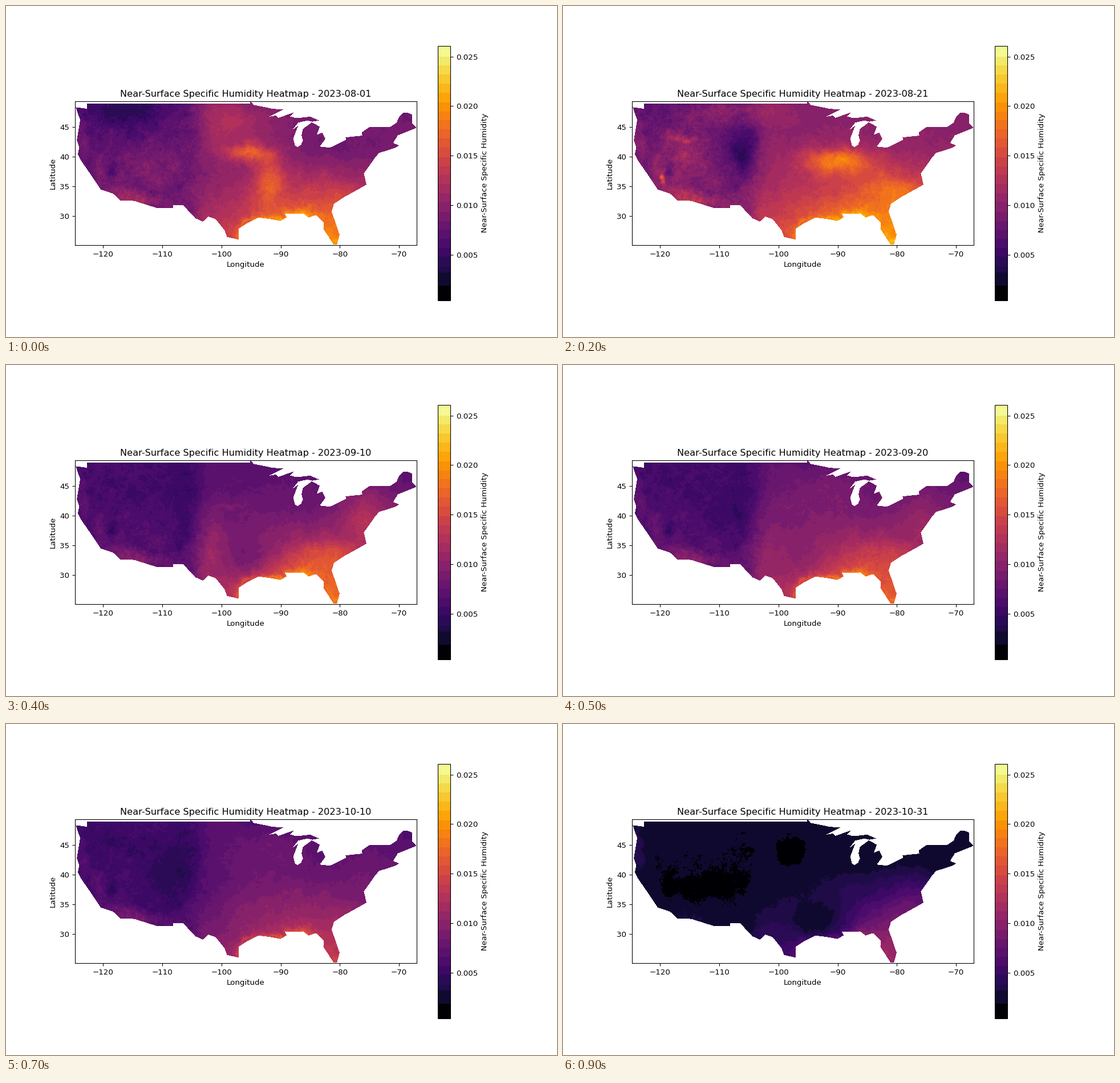
Write a matplotlib script that moves like this. It is 966x580 px and loops after 1 s.

```python
import matplotlib.pyplot as plt
import numpy as np
from matplotlib.animation import FuncAnimation
from matplotlib.colors import ListedColormap
from matplotlib.path import Path

WEST, EAST, SOUTH, NORTH = -124.767, -67.058, 25.067, 49.4
COLS, ROWS = 599, 253
VMIN, VMAX = 0.000385, 0.02609
FRAMES, LAST_DAY = 10, 91

# Key points of the outline in degrees, clockwise from the north-west corner.
SUPERIOR = [
    (-122.75, 49), (-95.15, 49), (-95.15, 49.4), (-94.6, 48.75), (-92.4, 48.3),
    (-91.4, 48.07), (-89.5, 48.0), (-92.1, 46.72), (-90.8, 46.95), (-90.4, 46.55),
    (-87.8, 47.47), (-88.45, 46.8), (-87.4, 46.5), (-85.0, 46.75), (-83.5, 46.1)]
MICHIGAN = [
    (-84.7, 45.9), (-85.5, 46.1), (-87.05, 45.75), (-88.0, 44.55), (-87.05, 45.25),
    (-87.9, 43.05), (-87.6, 41.85), (-87.2, 41.63), (-86.6, 41.95), (-86.25, 42.7),
    (-86.5, 43.6), (-86.25, 44.7), (-84.75, 45.78), (-83.4, 45.05), (-83.9, 43.7),
    (-83.0, 44.05), (-82.45, 43.0), (-83.4, 41.7), (-81.7, 41.5)]
NORTHEAST = [
    (-78.9, 42.85), (-79.05, 43.25), (-76.2, 43.55), (-76.3, 44.1), (-75.0, 44.98),
    (-71.5, 45.0), (-70.4, 45.75), (-70.0, 46.7), (-69.2, 47.45), (-68.3, 47.35),
    (-67.8, 47.07), (-67.8, 45.7), (-67.06, 44.85), (-70.2, 43.6), (-71.0, 42.3),
    (-70.0, 41.9), (-70.6, 41.5), (-73.4, 40.6)]
ATLANTIC = [
    (-74.1, 39.75), (-75.95, 37.15), (-75.5, 35.25), (-77.9, 33.9), (-79.2, 33.2),
    (-81.0, 32.0), (-81.4, 30.7), (-80.05, 26.8), (-80.5, 25.1), (-81.1, 25.15),
    (-82.8, 27.8), (-82.7, 28.8), (-84.0, 30.1)]
GULF = [
    (-85.3, 29.7), (-86.2, 30.38), (-89.3, 30.3), (-89.0, 29.7), (-90.1, 29.1),
    (-91.3, 29.35), (-93.8, 29.7), (-95.9, 28.6), (-97.1, 27.8), (-97.15, 25.95)]
RIO_GRANDE = [
    (-99.1, 26.4), (-99.5, 27.5), (-101.0, 29.4), (-102.3, 29.85), (-103.2, 28.98),
    (-104.5, 29.6), (-106.5, 31.75), (-108.2, 31.78), (-108.2, 31.33),
    (-111.07, 31.33), (-114.8, 32.5), (-117.1, 32.53)]
PACIFIC = [
    (-118.4, 33.75), (-120.5, 34.45), (-121.9, 36.6), (-123.8, 39.3), (-124.35, 40.4),
    (-124.1, 41.5), (-124.5, 42.8), (-123.95, 46.2), (-124.7, 48.35), (-122.8, 48.1)]

grid = np.meshgrid(np.linspace(WEST, EAST, COLS), np.linspace(NORTH, SOUTH, ROWS))
points = np.stack(grid, axis=-1).reshape(-1, 2)
outline = Path(SUPERIOR + MICHIGAN + NORTHEAST + ATLANTIC + GULF + RIO_GRANDE + PACIFIC)
land = outline.contains_points(points)


def terrain(seed, power):
    """Seeded fractal noise with unit deviation, on land cells only."""
    noise = np.random.default_rng(seed).normal(size=(ROWS, COLS))
    freq = np.hypot(np.fft.fftfreq(ROWS)[:, None], np.fft.fftfreq(COLS))
    rough = np.fft.ifft2(np.fft.fft2(noise) / (freq + 0.012) ** power).real
    return (rough / rough.std()).ravel()[land]


def step(x):
    return 1 / (1 + np.exp(-x))


# Warped coordinates give the weather systems ragged edges.
lon, lat = points[land].T
relief = terrain(4, 1.3) * (0.02 + 0.045 * step((-104 - lon) / 0.8))
lon = lon + 0.3 * terrain(5, 1.8)
lat = lat + 0.3 * terrain(6, 1.8)


def blob(x, y, rx, ry, height=1.0):
    return height * np.exp(-((lon - x) / rx) ** 2 - ((lat - y) / ry) ** 2)


along = np.linspace(0, len(GULF) - 1, 80)
shore = [np.interp(along, range(len(GULF)), axis) for axis in zip(*GULF)]
to_shore = np.min([np.hypot(lon - x, lat - y) for x, y in zip(*shore)], axis=0)
shore_glow = np.exp(-to_shore / 0.5)
gulf_air = blob(-83, 27, 14, 8)
inland = (7 + 2.5 * step((lon + 104) / 0.8) - 0.15 * (lat - 40)
          + blob(-114.5, 32.5, 4, 1.5, 3)       # desert monsoon
          + blob(-121, 38, 0.8, 2, 1.5)         # central valley
          + blob(-118.7, 37.6, 0.7, 1.3, -2)    # high sierra
          + blob(-124, 45, 1.3, 5, 1.8)         # pacific coast
          + blob(-80.8, 25.5, 0.8, 0.7, 2))     # everglades


def humidity(season, gulf, coast, *systems):
    """Field in g/kg; a system is (lon, lat, lon radius, lat radius, height)."""
    field = season * inland + gulf * gulf_air + coast * shore_glow
    field += sum(blob(*system) for system in systems)
    return np.maximum(field * (1 + relief), 0.5)


fields = {
    0: humidity(1, 7.5, 4, (-115, 48, 7, 2.5, -1.8), (-112, 38.5, 6, 4, 1.7),
                (-99, 46, 8, 5, 3.8), (-95.5, 40.5, 4, 1.5, 6), (-92.2, 36, 2.5, 4, 5),
                (-80, 41, 8, 3, -1.2)),
    2: humidity(1.15, 7, 3, (-108, 47.5, 9, 2.5, 2.6), (-116, 41, 4, 5, 2.5),
                (-106, 40, 2.5, 4, -3.8), (-90, 39, 5.5, 2.3, 7.5), (-80, 34.5, 6, 3, 3),
                (-115.5, 43.2, 2.5, 0.6, 3), (-119.5, 36.3, 0.5, 1.1, 6)),
    3: humidity(0.85, 8, 5, (-113, 42, 8, 4, -1.6), (-115, 48.8, 9, 2, 2.5),
                (-97.5, 42, 2.5, 7, 1.5), (-84, 43.5, 12, 3, -1.2),
                (-83, 32.5, 4, 2.5, 3), (-95, 31, 5, 3, -3)),
    4: humidity(0.85, 8, 4, (-118, 48, 7, 3, 1), (-101.5, 35, 2, 5, 2),
                (-98.8, 41.6, 2.5, 0.6, 1.5), (-75, 40, 5, 5, 4),
                (-106.5, 37.5, 1.8, 5, -1.2), (-95, 32.5, 4, 3, -2.5), (-83, 33, 5, 2.5, 2.5)),
    6: humidity(0.9, 5, 4.5, (-109, 39.5, 5, 4, -2), (-93, 44, 8, 4, 2.7),
                (-93, 35, 10, 4, 1.5), (-122, 39.6, 0.5, 1.1, 2), (-106.5, 40.3, 1.2, 1.2, -0.8)),
    8: humidity(0.65, 4, 4, (-115, 48.5, 12, 2.5, 1.7), (-107, 39.5, 3, 3, -1.2),
                (-109, 35, 5, 3, -1.2), (-115, 43, 2.5, 1, 1.2), (-74, 41, 5, 5, 1.8),
                (-101, 36, 3, 6, -1.3)),
    9: humidity(0.28, 8, 1.2, (-92, 31, 5.5, 4, -4.2), (-77, 36, 4, 4, 2.5),
                (-111, 38, 10, 2.5, -0.6), (-98, 43.5, 3.5, 4, -1), (-124, 45, 1.5, 5, 1.5),
                (-115, 48, 9, 4, 1)),
}


def frame_image(i):
    values = fields[i] if i in fields else (fields[i - 1] + fields[i + 1]) / 2
    image = np.full(land.shape, np.nan)
    image[land] = values / 1000
    return image.reshape(ROWS, COLS)


def banded_inferno():
    edges = np.r_[0, 27, 49, np.arange(60, 429, 16), 446.6] / 446.6
    middles = (edges[:-1] + edges[1:]) / 2
    middles[0] = 0.004
    shade = np.searchsorted(edges, (np.arange(256) + 0.5) / 256) - 1
    return ListedColormap(plt.get_cmap("inferno")(middles[shade]))


plt.rcParams["font.family"] = "DejaVu Sans"
fig, ax = plt.subplots(figsize=(10, 6.0042), dpi=96.6)
heatmap = ax.imshow(frame_image(0), extent=(WEST, EAST, SOUTH, NORTH), cmap=banded_inferno(),
                    vmin=VMIN, vmax=VMAX, interpolation="nearest")
fig.colorbar(heatmap, ax=ax, label="Near-Surface Specific Humidity")
ax.set_xlabel("Longitude")
ax.set_ylabel("Latitude")
title = ax.set_title("")


def update(i):
    date = np.datetime64("2023-08-01") + i * LAST_DAY // (FRAMES - 1)
    heatmap.set_data(frame_image(i))
    title.set_text(f"Near-Surface Specific Humidity Heatmap - {date}")
    return heatmap, title


anim = FuncAnimation(fig, update, frames=FRAMES, interval=100, repeat=True, repeat_delay=0)
plt.show()
```
